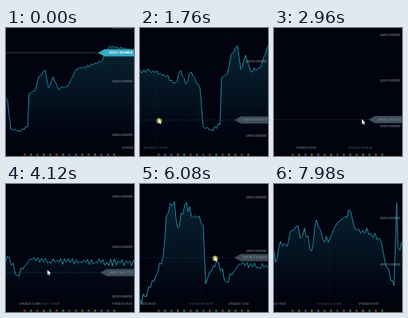
An HTML page with a canvas that plays this animation: 160 px wide and 160 px high, repeating every 8000 ms.

```html
<!DOCTYPE html>
<html lang="en">
<head>
<meta charset="utf-8">
<title>Price chart</title>
<style>
html, body { margin: 0; width: 100%; height: 100%; overflow: hidden; background: #01030f; }
canvas { display: block; width: 160px; height: 160px; }
</style>
</head>
<body>
<canvas id="stage"></canvas>
<script>
const LOOP = 8000, LOADED = 3620, MORE = 5100;
const FONT = '"Open Sans", Arial, sans-serif';
const canvas = document.getElementById('stage');
const ratio = Math.max(1, window.devicePixelRatio || 1);
canvas.width = canvas.height = 160 * ratio;
const c = canvas.getContext('2d');

let seed = 7;
function random() {
  seed = (seed * 16807) % 2147483647;
  return seed / 2147483647;
}

// Join turning points with jittery trades about every two pixels.
function market(turns, jitter) {
  const pts = [];
  turns.forEach(([x, y], i) => {
    pts.push([x, y]);
    if (i === turns.length - 1) return;
    const [x2, y2] = turns[i + 1];
    const n = Math.round((x2 - x) / 2.4);
    for (let k = 1; k < n; k++) {
      const side = k % 2 ? 1 : -1;
      pts.push([x + (x2 - x) * k / n, y + (y2 - y) * k / n + side * jitter * random()]);
    }
  });
  return pts;
}

// Chart coordinates of points as they appear in a given view.
const place = (pts, pan, scale, level) =>
  pts.map(([x, y]) => [x - pan, 125 + (y - level) / scale]);

const recent = market([[-20, 57], [12, 53], [30, 58], [44, 69], [51, 53], [57, 70], [64, 55],
  [75, 75], [79, 124], [89, 127], [100, 121], [102, 62], [109, 58], [114, 33], [122, 22],
  [126, 52], [132, 34], [138, 54], [150, 50], [161, 20], [191, 8], [203, -20], [238, -10]], 3);

const later = market([[74, 40], [79, 52], [82, 125], [87, 110], [98, 98], [108, 122], [124, 100],
  [148, 104], [330, 105]], 5);

const older = market([
  ...place([[-8, 74], [0, 84], [2, 98], [8, 72], [16, 78], [22, 58], [30, 52], [33, 68], [38, 55],
    [47, 84], [53, 45], [61, 70], [70, 68], [77, 52]], 227, .866, 78.7),
  ...place([[0, 78], [17, 68], [22, 83], [42, 87], [55, 94], [60, 113], [71, 133], [74.5, 60],
    [76, 100], [92, 89], [102, 88], [113, 71], [124, 85], [136, 90]], 148, .61, 99),
  [0, 145], [6, 141], [20, 114], [29, 90], [33, 40], [38, 24], [43, 22], [47, 55], [58, 23],
  [64, 40], [74, 40]], 6);
const full = older.concat(later);

// Views held between drags; p is the pointer, h the trailing crosshair.
const views = [
  { from: 0, to: 200, pan: -73, scale: .72, level: 127, px: 40, py: 80, hx: 40, hy: 80 },
  { from: 1700, to: 1780, pan: 0, scale: 1, level: 125, px: 24, py: 116, hx: 19, hy: 115 },
  { from: 2940, to: 3619, pan: 216, scale: .613, level: 117, px: 111, py: 117, hx: 108, hy: 114.5 },
  { from: 3620, to: 3700, pan: -150, scale: .93, level: 117, px: 30, py: 112, hx: 30, hy: 112 },
  { from: 4680, to: 5060, pan: -8, scale: .93, level: 117, px: 88, py: 108, hx: 87, hy: 109 },
  { from: 5900, to: 6100, pan: 0, scale: 1, level: 125, px: 94, py: 93, hx: 76, hy: 92 },
  { from: 6700, to: 6760, pan: 148, scale: .61, level: 99, px: 148, py: 99, hx: 147, hy: 87 },
  { from: 7900, to: 8000, pan: 227, scale: .866, level: 78.7, px: 170, py: 88, hx: 69, hy: 88 }
];

function viewAt(t) {
  const i = views.findLastIndex(v => v.from <= t);
  const a = views[i], b = views[i + 1];
  if (!b || t <= a.to) return a;
  const p = (t - a.to) / (b.from - a.to), e = p * p * (3 - 2 * p);
  const v = {};
  for (const k in a) v[k] = a[k] + (b[k] - a[k]) * e;
  return v;
}

function text(s, x, y, size, color, align = 'center', weight = 400) {
  c.font = `${weight} ${size}px ${FONT}`;
  c.textAlign = align;
  c.textBaseline = 'middle';
  c.fillStyle = color;
  c.fillText(s, x, y);
}

function rule(x1, y1, x2, y2, color, dash = []) {
  c.strokeStyle = color;
  c.lineWidth = .7;
  c.setLineDash(dash);
  c.beginPath();
  c.moveTo(x1, y1);
  c.lineTo(x2, y2);
  c.stroke();
  c.setLineDash([]);
}

function tag(y, value, left, fill, ink, weight) {
  c.fillStyle = fill;
  c.beginPath();
  c.moveTo(left, y);
  c.lineTo(left + 8, y - 4.5);
  c.lineTo(160, y - 4.5);
  c.lineTo(160, y + 4.5);
  c.lineTo(left + 8, y + 4.5);
  c.fill();
  text(value, 158, y, 4.1, ink, 'right', weight);
}

function clock(hours, seconds) {
  const d = new Date(Date.UTC(2023, 8, 9) + Math.round(hours * 2) * 18e5);
  return `${d.getUTCDate()}/9/2023 ${d.toISOString().slice(11, seconds ? 19 : 16)}`;
}

function plot(pts, X, Y) {
  c.beginPath();
  pts.forEach(([x, y]) => c.lineTo(X(x), Y(y)));
  c.strokeStyle = '#2199b3';
  c.lineWidth = 1;
  c.lineJoin = 'round';
  c.stroke();
  c.lineTo(X(pts[pts.length - 1][0]), 150);
  c.lineTo(X(pts[0][0]), 150);
  c.closePath();
  c.save();
  c.clip();
  const g = c.createLinearGradient(0, 15, 0, 146);
  g.addColorStop(0, 'rgba(22,92,112,.42)');
  g.addColorStop(.6, 'rgba(14,62,80,.26)');
  g.addColorStop(1, 'rgba(8,30,45,0)');
  c.fillStyle = g;
  c.fillRect(0, 0, 160, 150);
  for (let x = 1; x < 160; x += 3) rule(x, 0, x, 150, 'rgba(0,3,14,.4)', [2, 1]);
  c.restore();
}

function pointer(x, y, t) {
  const pressed = views.some(v => v.pan < 200 && Math.abs(t - v.to) < 50);
  if (pressed && t < 6500 && (t < LOADED || t > 5500)) {
    c.fillStyle = 'rgba(164,146,46,.85)';
    c.beginPath();
    c.arc(x, y, 3.6, 0, 7);
    c.fill();
  }
  c.save();
  c.translate(x - 1.2, y - 3.2);
  c.beginPath();
  [[0, 0], [0, 6.4], [1.5, 5.2], [2.6, 7.4], [3.5, 7], [2.5, 4.8], [4.4, 4.6]]
    .forEach(([a, b]) => c.lineTo(a, b));
  c.closePath();
  c.fillStyle = '#f0f3f6';
  c.fill();
  c.restore();
}

function taskbar() {
  c.fillStyle = '#030308';
  c.fillRect(0, 154.5, 160, 5.5);
  for (let i = 0; i < 15; i++) {
    c.fillStyle = `hsl(${i * 137 % 360} 28% 36%)`;
    c.fillRect(22 + i * 8, 157.3, 2.6, 2.2);
  }
}

function draw(t) {
  const { pan, scale, level, px, py, hx, hy } = viewAt(t);
  const early = t < LOADED;
  const X = x => x + pan, Y = y => level + (y - 125) * scale;
  const axis = early
    ? { y: 42, step: 93, x: 231, gap: 407, start: 24, hours: 24 }
    : { y: 84, step: 67, x: 123, gap: 116, start: 12, hours: 6 };
  const priceAt = y => 28200 + (axis.y - 125 - (y - level) / scale) / axis.step * 200;
  const hourAt = x => axis.start + (x - pan - axis.x) / axis.gap * axis.hours;

  c.setTransform(ratio, 0, 0, ratio, 0, 0);
  c.fillStyle = '#01030f';
  c.fillRect(0, 0, 160, 160);

  plot(early ? recent : t < MORE ? later : full, X, Y);

  for (let n = -4; n < 4; n++) {
    const x = X(axis.x + n * axis.gap), y = Y(axis.y - n * axis.step);
    if (y < 146) text((28200 + n * 200).toFixed(7), 158, y, 3.6, '#a3abb2', 'right');
    text(clock(hourAt(x), false), x, 150, 3.6, '#a3abb2');
  }

  // The last price is marked only while the newest trade is near the edge.
  const [lastX, lastY] = recent[recent.length - 1];
  if (early && X(lastX) < 180) {
    const y = Y(lastY + 1.7);
    rule(0, y, 120, y, '#3b5868');
    tag(y, '28337.2550808', 115, '#35abc6', '#fff', 700);
  }

  if (t > 200) {
    rule(hx, 0, hx, 146, 'rgba(38,98,124,.28)', [1, 1]);
    text(clock(hourAt(hx), true), hx, 150, 3.5, '#5c6771');
  }
  if (t > 200 && px < 164) {
    rule(0, hy, 120, hy, 'rgba(42,112,126,.6)', [1, 1]);
    tag(hy, priceAt(hy).toFixed(7), 118, '#3e4e59', '#8f9ba4', 400);
    pointer(px, py, t);
  }
  taskbar();
}

const start = performance.now();
function frame(now) {
  draw(Math.max(0, now - start) % LOOP);
  requestAnimationFrame(frame);
}
draw(0);
requestAnimationFrame(frame);
</script>
</body>
</html>
```
